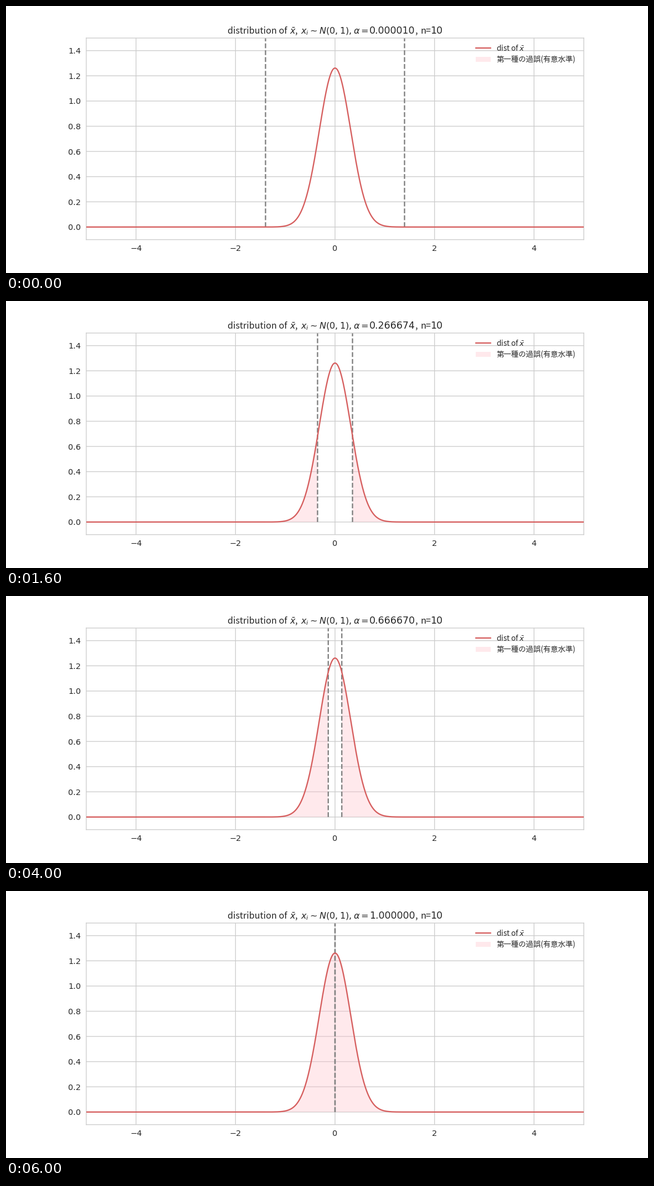
A matplotlib script that plays this animation: 1159 px wide and 483 px high, repeating every 6.2 s.

```python
import math

import matplotlib.pyplot as plt
import numpy as np
from matplotlib.animation import FuncAnimation
from matplotlib.lines import Line2D
from matplotlib.patches import Rectangle

W, H, DPI = 1159, 483, 100
K = W / 12 / DPI              # the layout is a 12 inch wide chart
N = 10
SIGMA = 1 / math.sqrt(N)
ALPHAS = np.linspace(1e-5, 1, 31)

RED, PINK, GRAY = "#d65f5f", "pink", "gray"
INK, RULE = "0.15", "0.8"
SANS, DIGITS = "Noto Sans CJK JP", "DejaVu Sans"
LINE, TITLE, LABEL = 1.75 * K, 12 * K, 10 * K
NUMBER = 1.08                 # digits are set slightly larger than letters

plt.rcParams["lines.solid_capstyle"] = "round"
fig = plt.figure(figsize=(W / DPI, H / DPI), dpi=DPI, facecolor="white")
ax = fig.add_axes([0.125, 0.125, 0.775, 0.755])


def density(x):
    return np.exp(-(x / SIGMA) ** 2 / 2) / (SIGMA * math.sqrt(2 * math.pi))


def critical(alpha):
    """Two-sided critical value of the sample mean, by bisection."""
    lo, hi = 0.0, 6.0
    for _ in range(50):
        mid = (lo + hi) / 2
        if math.erfc(mid / math.sqrt(2)) > alpha:
            lo = mid
        else:
            hi = mid
    return lo * SIGMA


def label(x, y, text, size, family=SANS):
    return fig.text(x / W, 1 - y / H, text, fontsize=size, family=family,
                    color=INK, ha="left", va="baseline")


def style_axes():
    ax.set_xlim(-5, 5)
    ax.set_ylim(-0.1, 1.5)
    ax.set_xticks(range(-4, 5, 2))
    ax.set_yticks(np.arange(0, 1.5, 0.2))
    ax.set_axisbelow(True)
    ax.grid(color=RULE, linewidth=K, snap=False)
    ax.tick_params(length=0, pad=7 * K, labelsize=LABEL * NUMBER,
                   labelcolor=INK, labelfontfamily=DIGITS)
    for spine in ax.spines.values():
        spine.set(color=RULE, linewidth=K, snap=False)


def draw_legend():
    fig.add_artist(Line2D([847.7 / W, 874.5 / W], [1 - 76 / H] * 2,
                          color=RED, linewidth=LINE))
    fig.add_artist(Rectangle((847.7 / W, 1 - 101.2 / H), 26.8 / W, 9.4 / H,
                             facecolor=PINK, alpha=0.35, linewidth=0))
    label(885.3, 80.6, r"dist of $\bar{x}$", LABEL)
    label(885.3, 100.8, "第一種の過誤(有意水準)", LABEL)


def draw_title():
    label(400, 50, "distribution of", TITLE)
    label(512.5, 50, r"$\bar{x}$,", TITLE)
    label(531.5, 50, r"$x_i \sim N(0, 1), \alpha =$", TITLE)
    label(738.5, 50, ",", TITLE)
    label(748, 50, "n=", TITLE)
    label(766.5, 50, str(N), TITLE * NUMBER, DIGITS)
    return label(656, 50, "", TITLE * NUMBER, DIGITS)


style_axes()
draw_legend()
counter = draw_title()

xs = np.linspace(-5, 5, 1001)
ax.plot(xs, density(xs), color=RED, linewidth=LINE, zorder=3)
bars = [ax.plot([], [], "--", color=GRAY, linewidth=LINE, snap=False)[0]
        for _ in range(2)]
tails = [ax.fill([0], [0], facecolor=PINK, alpha=0.35, linewidth=0)[0]
         for _ in range(2)]


def update(i):
    c = critical(ALPHAS[i])
    x = np.linspace(c, 5, 500)
    tail_x = np.r_[c, x, 5]
    tail_y = np.r_[0, density(x), 0]
    for side, bar, tail in zip((-1, 1), bars, tails):
        bar.set_data([side * c] * 2, [0, 1.5])
        tail.set_xy(np.c_[side * tail_x, tail_y])
    counter.set_text(f"{ALPHAS[i]:.6f}")
    return [*bars, *tails, counter]


anim = FuncAnimation(fig, update, frames=len(ALPHAS), interval=200,
                     repeat=True, repeat_delay=0)
plt.show()
```
